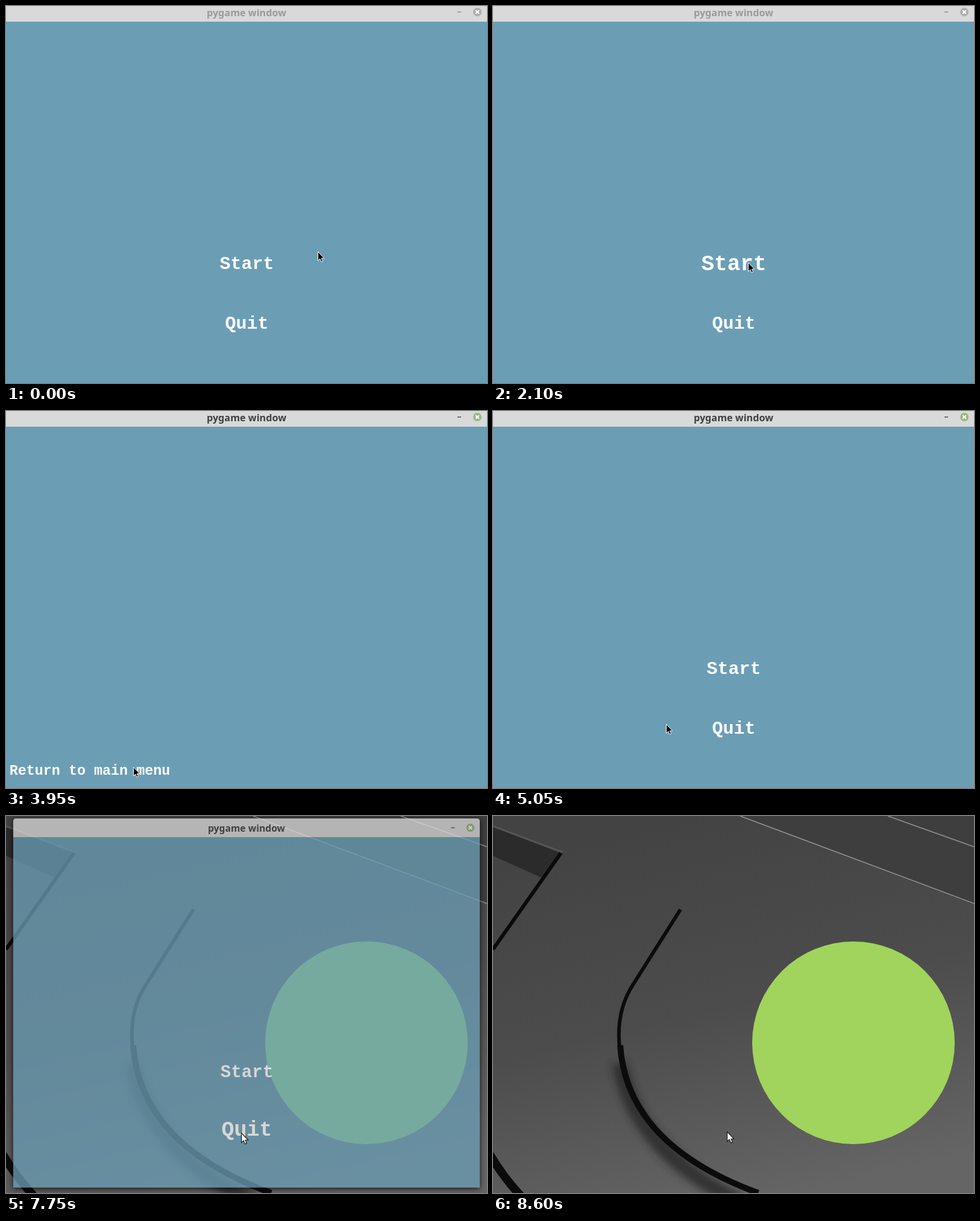
An HTML page for the animation above (9.05 s loop, 798x625 px).

```html
<!DOCTYPE html>
<html lang="en">
<head>
<meta charset="utf-8">
<title>pygame window</title>
<style>
  html, body { margin: 0; width: 100%; height: 100%; overflow: hidden; background: #4a4a4a; }
  svg { display: block; width: 100vw; height: 100vh; }
  .label { font-family: "Liberation Mono", "Courier New", monospace; font-weight: 700; fill: #fff; text-anchor: middle; }
  .title { font: 700 16.2px "Noto Sans", sans-serif; text-anchor: middle; }
</style>
</head>
<body>
<svg viewBox="0 0 798 625" xmlns="http://www.w3.org/2000/svg">
  <defs>
    <linearGradient id="desk" x1="0.35" y1="0" x2="0.65" y2="1">
      <stop offset="0" stop-color="#434343"/>
      <stop offset="0.5" stop-color="#4c4c4c"/>
      <stop offset="1" stop-color="#656565"/>
    </linearGradient>
    <filter id="soft" x="-30%" y="-30%" width="160%" height="160%"><feGaussianBlur stdDeviation="7"/></filter>
  </defs>

  <g id="desktop">
    <path fill="url(#desk)" d="M0 0H798V625H0Z"/>
    <path fill="#3e3e3e" d="M410 0H798V145Z"/>
    <path fill="none" stroke="#929292" stroke-width="1.5" d="M410 0L798 145M655 0L798 51"/>
    <path fill="#2b2b2b" d="M0 18L113 61L82 103L0 66Z"/>
    <g fill="none">
      <path stroke="#0a0a0a" stroke-width="6" d="M113 61L0 221"/>
      <path stroke="#555" stroke-width="3" d="M0 17L115 60"/>
      <path stroke="#262626" stroke-width="26" opacity=".8" filter="url(#soft)" d="M210 410Q236 555 410 640"/>
      <path stroke="#0b0b0b" stroke-width="6" d="M311 155L232 280Q199 331 213 404"/>
      <path stroke="#0b0b0b" stroke-width="10" d="M211 380Q222 545 440 625"/>
      <path stroke="#0b0b0b" stroke-width="14" d="M-6 560Q18 600 48 632"/>
    </g>
    <circle cx="598" cy="376" r="168" fill="#a0d45c"/>
  </g>

  <g id="window">
    <path fill="#d9d9d9" d="M0 26V-1Q0 -6 5 -6H793Q798 -6 798 -1V26Z"/>
    <path fill="#6b9eb5" d="M0 26H798V625H0Z"/>
    <text id="title" class="title" x="399" y="17">pygame window</text>
    <path id="minimize" d="M749 9H755V11H749Z"/>
    <circle id="close" cx="782" cy="10" r="7"/>
    <path stroke="#fff" stroke-width="2" d="M779.2 7.2L784.8 12.8M784.8 7.2L779.2 12.8"/>
    <text id="start" class="label">Start</text>
    <text id="quit" class="label">Quit</text>
    <text id="back" class="label">Return to main menu</text>
  </g>

  <path id="cursor" stroke-width="1" d="M.5 .5V15L3.8 12L6 17L8.5 16L6.3 11.2H10.8Z"/>
</svg>
<script>
const LOOP = 9050, STEP = 50;
const OPEN = 2600, RETURN = 4650, FADE = 7750, GONE = 7850;

const home = { x: 517, y: 407 };
const moves = [
  { from: 250, to: 450, x: 424, y: 425 },
  { from: 700, to: 1200, x: 416, y: 540 },
  { from: 1350, to: 1350, x: 416, y: 529 },
  { from: 1800, to: 2100, x: 423, y: 425 },
  { from: 3200, to: 3950, x: 211, y: 590 },
  { from: 4950, to: 5150, x: 327, y: 481 },
  { from: 5300, to: 5400, x: 346, y: 475 },
  { from: 6200, to: 6400, x: 390, y: 525 },
  { from: 8550, to: 8600, x: 388, y: 523 }
];

const buttons = {
  start: { x: 399.5, y: 426.7, size: 30, hoverSize: 36 },
  quit: { x: 399.5, y: 525.5, size: 30, hoverSize: 36 },
  back: { x: 139, y: 596.2, size: 20, hoverSize: 23.4 }
};

const el = id => document.getElementById(id);
const set = (id, attrs) => {
  for (const name in attrs) el(id).setAttribute(name, attrs[name]);
};
const clamp = v => Math.max(0, Math.min(1, v));
const ease = k => (1 - Math.cos(Math.PI * k)) / 2;
const mix = (a, b, k) => Math.round(a + (b - a) * k);

// The first visible step of a move falls on its "from" time.
function cursorAt(t) {
  return moves.reduce((p, m) => {
    const begin = m.from - STEP;
    const k = ease(clamp((t - begin) / (m.to - begin)));
    return { x: mix(p.x, m.x, k), y: mix(p.y, m.y, k) };
  }, home);
}

function drawButton(id, visible, cursor) {
  const b = buttons[id];
  const halfWidth = el(id).textContent.length * b.size * 0.3;
  const hovered = Math.abs(cursor.x - b.x) < halfWidth && Math.abs(cursor.y - b.y) < b.size * 0.45;
  const size = hovered ? b.hoverSize : b.size;
  set(id, {
    x: b.x, y: b.y + size * 0.31, "font-size": size,
    visibility: visible ? "visible" : "hidden"
  });
}

function render(t) {
  const cursor = cursorAt(t);
  const active = t >= OPEN, menu = t < OPEN || t >= RETURN;
  const fading = t >= FADE && t < GONE, desktop = t >= FADE;

  el("desktop").style.display = desktop ? "" : "none";
  el("window").style.display = t < GONE ? "" : "none";
  el("window").style.filter = fading ? "drop-shadow(0 2px 5px #000)" : "none";
  set("window", {
    opacity: fading ? 0.76 : 1,
    transform: fading ? "translate(399 310) scale(.97) translate(-399 -309.5)" : ""
  });

  set("title", { fill: active ? "#404040" : "#9a9a9a" });
  set("minimize", { fill: active ? "#707070" : "#a0a0a0" });
  set("close", { fill: active ? "#9ab87c" : "#adadad" });

  drawButton("start", menu, cursor);
  drawButton("quit", menu, cursor);
  drawButton("back", !menu, cursor);

  set("cursor", {
    transform: `translate(${cursor.x} ${cursor.y})` + (desktop ? " scale(1.1)" : ""),
    fill: desktop ? "#fff" : "#000",
    stroke: desktop ? "#111" : "#fff"
  });
}

const begin = performance.now();
function tick() {
  const t = (performance.now() - begin) % LOOP;
  render(Math.floor(t / STEP) * STEP);
  requestAnimationFrame(tick);
}
tick();
</script>
</body>
</html>
```
